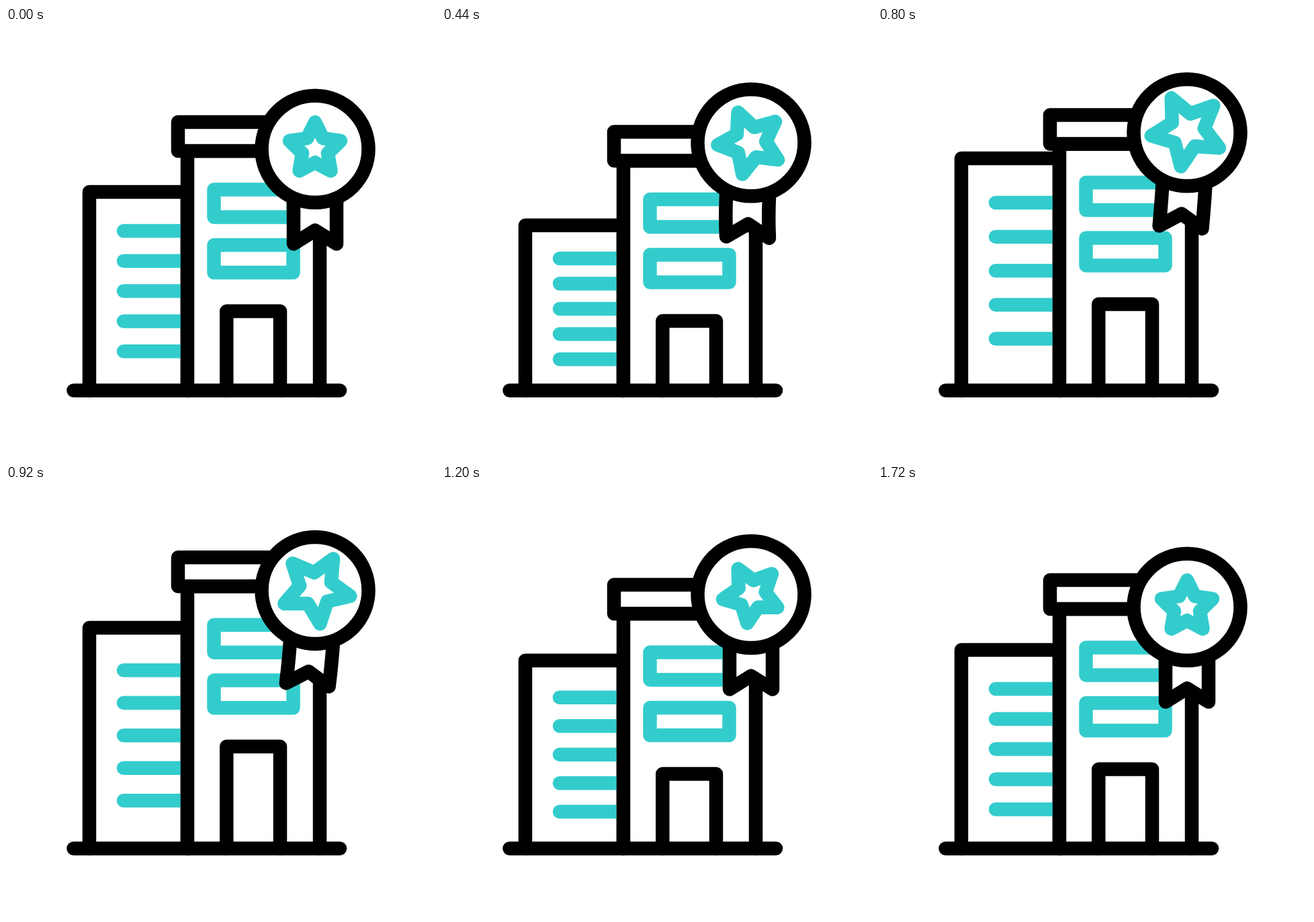
Recreate the animation shown at these times as an HTML page. Size 640x640 px, loop 2 s.

```html
<!DOCTYPE html>
<html lang="en">
<head>
<meta charset="utf-8">
<title>Award building</title>
<style>
  html, body { margin: 0; width: 100%; height: 100%; overflow: hidden; background: #fff; }
  svg { display: block; width: 100vw; height: 100vh; }
  path, circle { stroke: #000; stroke-width: 20.5; stroke-linecap: round; stroke-linejoin: round; fill: none; }
  .teal { stroke: #3cc; }
  .solid { fill: #fff; }
</style>
</head>
<body>
<svg viewBox="0 0 640 640">
  <path id="left" class="solid"/>
  <path id="lines" class="teal"/>
  <path id="walls" class="solid"/>
  <g id="front">
    <path class="solid" d="M256 140H470V183H256Z"/>
    <path class="teal" d="M309.5 240.5H427.5V281.5H309.5ZM309.5 323H427.5V364H309.5Z"/>
  </g>
  <path id="door"/>
  <path d="M100.5 539.5H497"/>
  <path id="ribbon" class="solid"/>
  <circle id="medal" class="solid" cx="460" r="79.5"/>
  <path id="star" class="teal"/>
</svg>
<script>
const LOOP = 2000, STEP = 40, GROUND = 539.5, CX = 460;
const el = id => document.getElementById(id);
const setPath = (id, d) => el(id).setAttribute('d', d);

const progress = (t, from, to) => Math.min(1, Math.max(0, (t - from) / (to - from)));
const soft = u => u * u * (3 - 2 * u);
const firm = u => u * u / (u * u + (1 - u) * (1 - u));

// Rises from 0 to 1 at the peak and falls back.
const bump = (t, from, peak, to, ease) =>
  ease(t < peak ? progress(t, from, peak) : progress(t, to, peak));

// Swings from 0 through each peak back to 0, one beat per turning point.
function swing(t, beats, peaks) {
  const v = [0, ...peaks, 0];
  return beats.slice(1).reduce(
    (sum, b, i) => sum + (v[i + 1] - v[i]) * soft(progress(t, beats[i], b)), 0);
}

const LEFT_BEATS = [40, 510, 800, 1160, 1600];
const FRONT_BEATS = [230, 600, 962, 1245, 1640];
const RIBBON_BEATS = [40, 310, 600, 850, 1120];

// A full turn: a slow wind-up, then a quick release that dies away.
function starTurn(t) {
  const release = 630, held = 93;
  return t < release
    ? held * progress(t, 40, release) ** 1.6
    : 360 - (360 - held) * (1 - progress(t, release, 1470)) ** 2;
}

// Point at (x, y) from the medal's centre, turned by deg.
function turned(x, y, deg, cy) {
  const a = deg * Math.PI / 180, c = Math.cos(a), s = Math.sin(a);
  return `${(CX + x * c - y * s).toFixed(2)} ${(cy + x * s + y * c).toFixed(2)}`;
}

function drawLeft(t) {
  const top = 244 + swing(t, LEFT_BEATS, [53, -50, 16]);
  const first = 302 + swing(t, LEFT_BEATS, [43.5, -42, 13]);
  const last = 481.2 + swing(t, LEFT_BEATS, [12.5, -18.7, 3.7]);
  setPath('left', `M124 ${GROUND}V${top}H270V${GROUND}`);
  let d = '';
  for (let i = 0; i < 5; i++) d += `M175 ${first + (last - first) * i / 4}H262`;
  setPath('lines', d);
}

function drawFront(t) {
  const dy = swing(t, FRONT_BEATS, [24.3, -36, 10]);
  setPath('walls', `M270 ${GROUND}V${183 + dy}H467V${GROUND}`);
  setPath('door', `M328.3 ${GROUND}V${421.5 + dy}H408V${GROUND}`);
  el('front').setAttribute('transform', `translate(0 ${dy})`);
}

function drawRibbon(t, cy) {
  const top = swing(t, RIBBON_BEATS, [11, -6.5, 4.5]);
  const tip = swing(t, RIBBON_BEATS, [11, -10.2, 5.5]);
  const at = (x, y, deg) => turned(x, y, deg, cy);
  setPath('ribbon', `M${at(-32, 72, top)}Q${at(-32, 106, top)} ${at(-32, 141, tip)}`
    + `L${at(0, 121, tip)}L${at(32, 141, tip)}Q${at(32, 106, top)} ${at(32, 72, top)}`);
}

function drawStar(t, cy) {
  const r = 40 + 14.3 * bump(t, 40, 750, 1400, soft);
  const inner = 4 + 0.4 * r, turn = starTurn(t);
  const sag = 1.25, drop = sag * r / 40; // the pivot sits just above the star's centre
  const pts = Array.from({ length: 10 }, (_, i) => {
    const a = i * Math.PI / 5, d = i % 2 ? inner : r;
    return turned(d * Math.sin(a), drop - d * Math.cos(a), turn, cy - sag);
  });
  setPath('star', `M${pts.join('L')}Z`);
}

function draw(t) {
  const cy = 180.2 - 24.8 * bump(t, 80, 900, 1720, firm);
  drawLeft(t);
  drawFront(t);
  drawRibbon(t, cy);
  el('medal').setAttribute('cy', cy);
  drawStar(t, cy);
}

const start = performance.now();
function frame() {
  const t = (performance.now() - start) % LOOP;
  draw(Math.floor(t / STEP) * STEP);
  requestAnimationFrame(frame);
}
frame();
</script>
</body>
</html>
```
